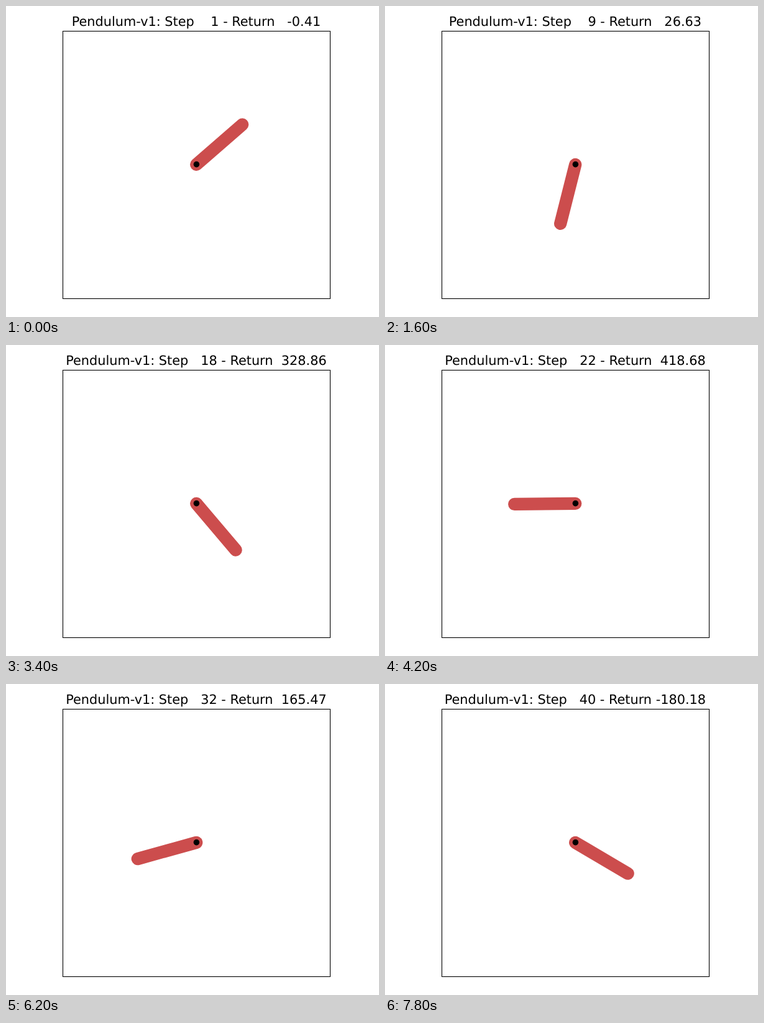
Write an HTML page that moves like this. It is 600 by 500 pixels and loops after 8000 ms.

```html
<!DOCTYPE html>
<html>
<head>
<meta charset="utf-8">
<style>
  html, body { margin: 0; width: 100%; height: 100%; overflow: hidden; background: #fff; }
  svg { display: block; }
  text {
    font: 20.83px "DejaVu Sans", sans-serif;
    white-space: pre;
    text-anchor: middle;
    text-rendering: geometricPrecision;
  }
</style>
</head>
<body>
<svg width="600" height="500" viewBox="0 0 600 500">
  <rect x="91.5" y="40.5" width="430" height="430" fill="none" stroke="#000" stroke-width="1.1"/>
  <text id="title" x="305.9" y="32" xml:space="preserve"></text>
  <line id="rod" stroke="#cc4d4d" stroke-width="20.3" stroke-linecap="round"/>
  <circle cx="306.4" cy="254.6" r="4.8"/>
</svg>
<script>
const STEP_MS = 200;
const STEPS = 40;
const ROD_LENGTH = 98;
const PIVOT = { x: 306.2, y: 254.9 };

// Turning points of the swing: [step, degrees clockwise from hanging down].
// The last stroke carries the rod over the top.
const swings = [
  [1, -131], [6.5, 88], [11.4, -55], [14, 24.6], [17, -54],
  [22, 89.4], [25, -61], [29.91, 130.7], [40, -419.5]
];

// The running total between its bends: [step, return].
const returns = [
  [1, -0.41], [7, -2.35], [9, 26.63], [15, 261.5],
  [22, 418.68], [28, 270.05], [35, 87.03], [40, -180.18]
];

const linear = u => u;
const swing = u => (1 - Math.cos(Math.PI * u)) / 2;

function valueAt(points, step, ease) {
  const i = Math.max(1, points.findIndex(([s]) => s >= step));
  const [s0, v0] = points[i - 1];
  const [s1, v1] = points[i];
  return v0 + (v1 - v0) * ease((step - s0) / (s1 - s0));
}

const title = document.getElementById("title");
const rod = document.getElementById("rod");
rod.setAttribute("x1", PIVOT.x);
rod.setAttribute("y1", PIVOT.y);

function draw(time) {
  const step = 1 + Math.floor(time / STEP_MS) % STEPS;
  const angle = valueAt(swings, step, swing) * Math.PI / 180;
  rod.setAttribute("x2", PIVOT.x - ROD_LENGTH * Math.sin(angle));
  rod.setAttribute("y2", PIVOT.y + ROD_LENGTH * Math.cos(angle));
  const stepText = String(step).padStart(4);
  const returnText = valueAt(returns, step, linear).toFixed(2).padStart(7);
  title.textContent = `Pendulum-v1: Step ${stepText} - Return ${returnText}`;
}

const start = performance.now();
function tick() {
  draw(performance.now() - start);
  requestAnimationFrame(tick);
}
tick();
</script>
</body>
</html>
```
